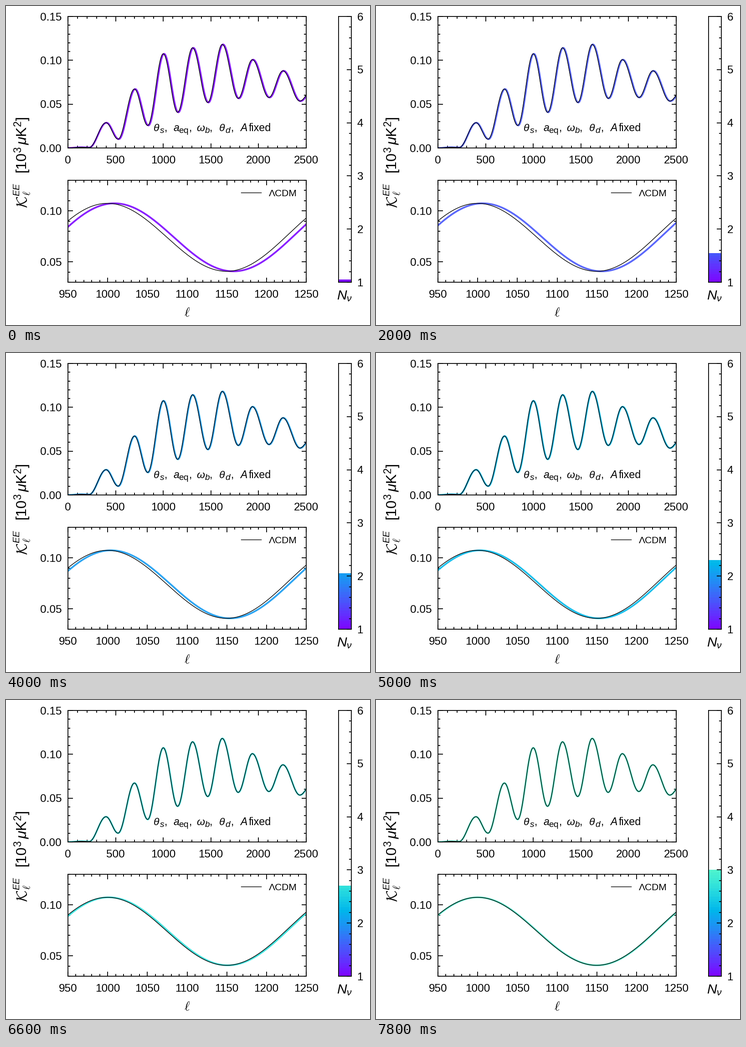
Animation, 799 px wide and 701 px high, one loop 8000 ms. Source, as a matplotlib script:

```python
import numpy as np
import matplotlib.pyplot as plt
from matplotlib.animation import FuncAnimation
from matplotlib.ticker import MultipleLocator

W, H, DPI = 799, 701, 100
PT = 72 / DPI  # points per pixel
FRAMES, STEP_MS, DN = 40, 200, 0.05

plt.rcParams.update({
    "font.family": "Liberation Sans",
    "mathtext.fontset": "custom",
    "mathtext.rm": "Liberation Sans",
    "mathtext.it": "Liberation Sans:italic",
    "axes.linewidth": 1.8 * PT,
})

# Heights of the acoustic peaks and of the dips that follow them
PEAKS = [0.0288, 0.0672, 0.1074, 0.1142, 0.1181, 0.1007, 0.0880, 0.0700]
DIPS = [0.0101, 0.0257, 0.0407, 0.0519, 0.0566, 0.0576, 0.0535, 0.0500]

# Peaks and dips alternate with a slowly growing spacing
n = np.arange(len(PEAKS))
peak_ell = 399 + 295.9 * n + 2.23 * n**2
dip_ell = 525 + 309.5 * n + 1.4 * n**2
TURN_X = np.r_[0, 140, 222, np.c_[peak_ell, dip_ell].ravel()]
TURN_Y = np.r_[0, 0.0008, 0.0005, np.c_[PEAKS, DIPS].ravel()]


def spectrum(ell):
    """Join the turning points with half cosine waves."""
    k = np.clip(np.searchsorted(TURN_X, ell, side="right") - 1,
                0, len(TURN_X) - 2)
    t = (ell - TURN_X[k]) / (TURN_X[k + 1] - TURN_X[k])
    return TURN_Y[k] + (TURN_Y[k + 1] - TURN_Y[k]) * (1 - np.cos(np.pi * t)) / 2


def shifted(ell, nu):
    shift = 0.6 + 4.2 * (3 - nu)
    return spectrum(ell - shift * np.clip((ell - 150) / 400, 0, 1))


def hue(nu):
    return plt.cm.rainbow((nu - 1) / 5)


fig = plt.figure(figsize=(W / DPI, H / DPI), dpi=DPI, facecolor="white")


def panel(x0, y0, x1, y1, xlim, ylim):
    ax = fig.add_axes([x0 / W, 1 - y1 / H, (x1 - x0) / W, (y1 - y0) / H])
    ax.set(xlim=xlim, ylim=ylim)
    return ax


def ticks(axis, major, minor):
    axis.set_major_locator(MultipleLocator(major))
    axis.set_minor_locator(MultipleLocator(minor))


def style(ax, **sides):
    for which, size in (("major", 10.5), ("minor", 5.3)):
        ax.tick_params(which=which, direction="in", length=size * PT,
                       width=1.8 * PT, labelbottom=False, labelleft=False,
                       **sides)


def label(x, y, s, size, ha="left", **kw):
    fig.text(x / W, 1 - y / H, s, fontsize=size * PT, ha=ha, va="baseline",
             **kw)


def upright(x, y, s, size, **kw):
    label(x, y, s, size, rotation=90, rotation_mode="anchor", **kw)


def number_axes(ax, xs=(), ys=(), size=24.2):
    """Write tick numbers below and to the left of a panel."""
    for v in xs:
        x, _ = ax.transData.transform((v, 0))
        y = H - ax.bbox.y0
        label(x - 0.3, y + 34, str(v), size, ha="center")
    for v in ys:
        _, y = ax.transData.transform((0, v))
        label(122, H - y + 8.6, f"{v:.2f}", size, ha="right")


top = panel(136, 23, 659, 312, (0, 2500), (0, 0.15))
low = panel(136, 383, 659, 607, (950, 1250), (0.03, 0.13))
bar = panel(730, 23, 758, 607, (0, 1), (1, 6))

ticks(top.xaxis, 500, 100)
ticks(low.xaxis, 50, 10)
for ax in (top, low):
    ticks(ax.yaxis, 0.05, 0.01)
    style(ax, top=True, right=True, bottom=True, left=True)
ticks(bar.yaxis, 1, 0.2)
bar.xaxis.set_ticks([])
style(bar, left=False, right=True)

number_axes(top, range(0, 2501, 500), np.arange(4) * 0.05)
number_axes(low, range(950, 1251, 50), (0.05, 0.10))
for v in range(1, 7):
    label(770.5, 615.5 - (v - 1) * 116.8, str(v), 24.2)

# Axis names
label(398, 682, r"$\ell$", 28, ha="center", math_fontfamily="cm")
label(725.5, 645, r"$N_\nu$", 30)
upright(46, 444, r"$\mathcal{K}$", 33, math_fontfamily="cm")
upright(30, 418, r"$EE$", 20.5)
upright(53, 417, r"$\ell$", 22, math_fontfamily="cm")
upright(46, 368, r"$[10^3\,\mu\mathrm{K}^2]$", 32.3)

# Note inside the upper panel
for x, main, gap, sub, end in ((323, r"\theta", 14, "s", 348),
                               (367, "a", 12, r"\mathrm{eq}", 402),
                               (418, r"\omega", 18, "b", 447),
                               (467, r"\theta", 14, "d", 494)):
    label(x, 275, f"${main}$", 23)
    label(x + gap, 279, f"${sub}$", 19)
    label(end, 275, ",", 23)
label(513, 275, "$A$", 23)
label(533, 275, "fixed", 23.3)

# Legend
fig.add_artist(plt.Line2D([516 / W, 560 / W], [1 - 410 / H] * 2,
                          color="black", lw=1.4 * PT))
label(577, 418.5, "ΛCDM", 21)

# Curves and the filling scale
grids = [np.linspace(0, 2500, 1500), np.linspace(950, 1250, 500)]
waves = []
for ax, ell in zip((top, low), grids):
    waves.append(ax.plot(ell, shifted(ell, 1), lw=3.8 * PT, alpha=0.9)[0])
    ax.plot(ell, spectrum(ell), color="black", lw=1.4 * PT)

levels = 1 + DN * np.arange(1, FRAMES + 1)
bands = [bar.axhspan(nu - DN, nu, color=hue(nu), lw=0) for nu in levels]


def update(i):
    nu = levels[i]
    for wave, ell in zip(waves, grids):
        wave.set_ydata(shifted(ell, nu))
        wave.set_color(hue(nu))
    for k, band in enumerate(bands):
        band.set_visible(k <= i)
    return waves + bands


anim = FuncAnimation(fig, update, frames=FRAMES, interval=STEP_MS,
                     repeat=True, repeat_delay=0, blit=False)
plt.show()
```
